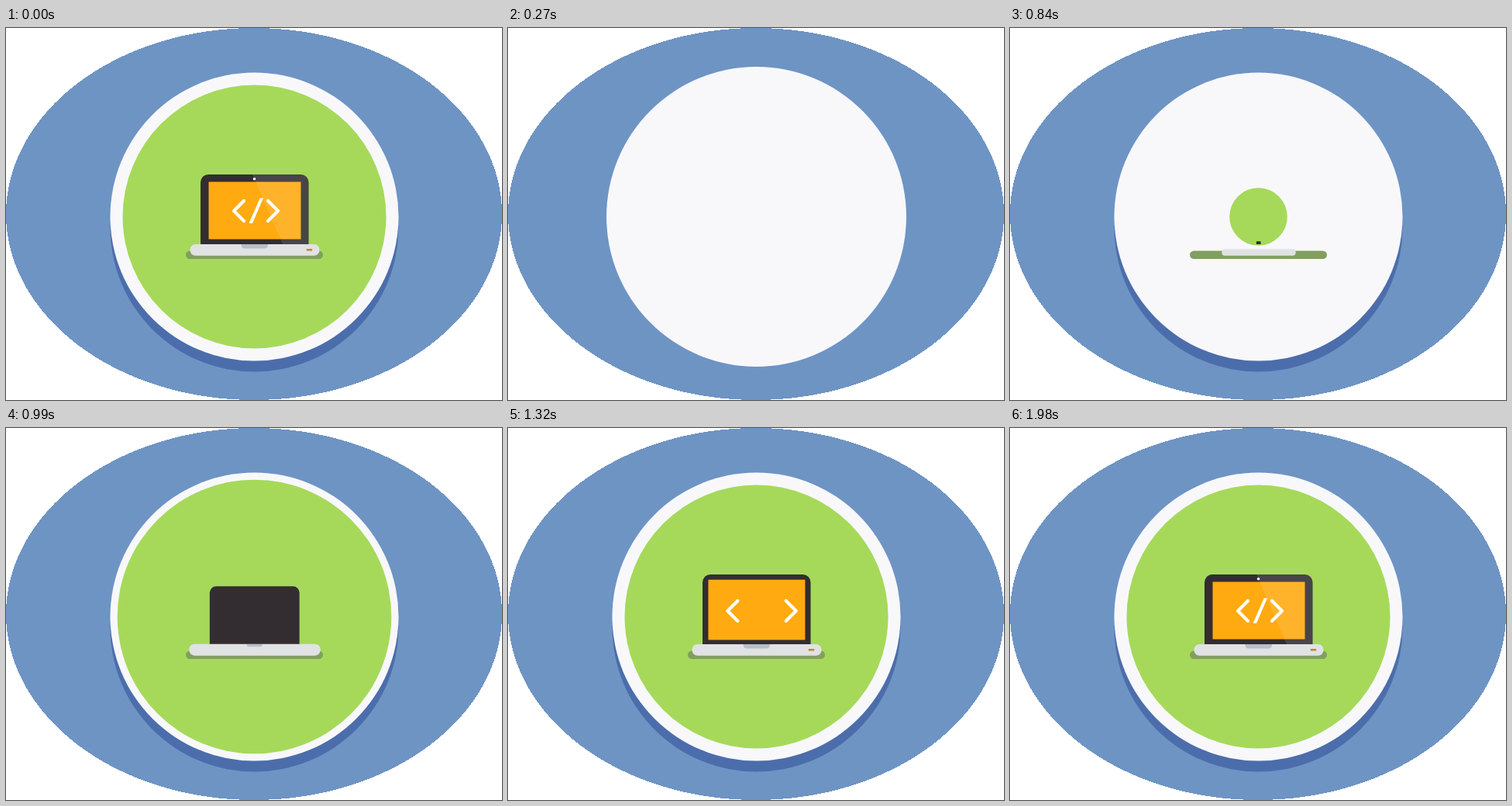
Write an HTML page that moves like this. It is 640 px wide and 480 px high and loops after 4.13 s.

```html
<!DOCTYPE html>
<html lang="en">
<head>
<meta charset="utf-8">
<title>Laptop badge</title>
<style>
  html, body { margin: 0; width: 100%; height: 100%; overflow: hidden; background: #fff; }
  svg { display: block; width: 100%; height: 100%; }
</style>
</head>
<body>
<svg viewBox="0 0 640 480">
  <defs>
    <clipPath id="display"><use href="#screen"/></clipPath>
  </defs>
  <ellipse cx="320" cy="240" rx="320" ry="240" fill="#6e94c4" shape-rendering="crispEdges"/>
  <circle id="shadow" cx="320.5" cy="257.5" r="186" fill="#4c6dab"/>
  <circle id="plate" cx="320.5" cy="243.5" r="186" fill="#f8f8fb"/>
  <circle id="disc" cx="320.5" cy="243.5" r="170" fill="#a6d95a"/>
  <rect id="ground" x="232" y="287.5" width="177" height="10.5" rx="5.25" fill="#829f5f"/>
  <path id="lid" d="M251 279V199a10 10 0 0 1 10-10H380.5a10 10 0 0 1 10 10V279Z" fill="#332d31"/>
  <rect id="screen" x="261.5" y="198.5" width="119" height="74" fill="#ffaa10"/>
  <g clip-path="url(#display)" fill="none" stroke="#fff" stroke-width="4.2" stroke-linecap="round" stroke-linejoin="round">
    <path id="left" d="M307 223L294 236L307 249"/>
    <path id="right" d="M338 223L351 236L338 249"/>
    <path id="slash" d="M327.7 219.5H332L318 252H313.5Z" fill="#fff" stroke="none"/>
  </g>
  <circle id="camera" cx="320.5" cy="194.7" r="1.8" fill="#fff"/>
  <path id="gloss" d="M318 189H380.5a10 10 0 0 1 10 10V279H357Z" fill="#fff"/>
  <rect id="base" x="237.5" y="279" width="167" height="14.7" rx="7" fill="#e1e2e3"/>
  <path id="notch" d="M303.5 279H338V280a4.5 4.5 0 0 1-4.5 4.5H308a4.5 4.5 0 0 1-4.5-4.5Z" fill="#b4bfcb"/>
  <rect id="light" x="387.7" y="285" width="7.5" height="2.4" rx=".6" fill="#c48826"/>
</svg>
<script>
  const LOOP = 4130, TICK = 30, SETTLE = 90;
  const clamp = v => Math.min(1, Math.max(0, v));
  const ease = u => u < .5 ? 4 * u ** 3 : 1 - 4 * (1 - u) ** 3;
  const progress = (t, start, length) => ease(clamp((t - start) / length));

  // Parts that pop up around a fixed point
  const pops = [
    { id: 'plate',  x: 320.5, y: 243.5, start: 30 },
    { id: 'shadow', x: 320.5, y: 257.5, start: 300 },
    { id: 'ground', x: 320.5, y: 292.7, start: 330, peak: 1 },
    { id: 'base',   x: 321,   y: 293.7, start: 715, peak: 1.02 },
    { id: 'disc',   x: 320.5, y: 243.5, start: 750 },
    { id: 'lid',    x: 320.7, y: 279,   start: 763, length: 360 },
    { id: 'notch',  x: 320.7, y: 279,   start: 865 },
    { id: 'light',  x: 391.5, y: 286.2, start: 1020 },
    { id: 'screen', x: 323,   y: 254,   start: 1080, peak: 1.05 },
    { id: 'camera', x: 320.5, y: 194.7, start: 1290 },
    { id: 'slash',  x: 322.8, y: 235.7, start: 1380 }
  ];
  const slides = [
    { id: 'left',  from: -60, start: 1165 },
    { id: 'right', from: 60,  start: 1186 }
  ];

  const part = id => document.getElementById(id);

  function draw(t) {
    for (const { id, x, y, start, length = 240, peak = 1.04 } of pops) {
      const settled = clamp((t - start - length) / SETTLE);
      const s = progress(t, start, length) * peak - (peak - 1) * ease(settled);
      part(id).setAttribute('transform', `translate(${x} ${y}) scale(${s}) translate(${-x} ${-y})`);
    }
    for (const { id, from, start } of slides) {
      const x = from * (1 - progress(t, start, 240));
      part(id).setAttribute('transform', `translate(${x} 0)`);
    }
    part('gloss').setAttribute('opacity', .11 * clamp((t - 1620) / 360));
  }

  function frame() {
    const t = performance.now() % LOOP;
    // The finished badge stays for one tick before the build begins
    draw(t < TICK ? LOOP : Math.floor(t / TICK) * TICK);
    requestAnimationFrame(frame);
  }
  frame();
</script>
</body>
</html>
```
